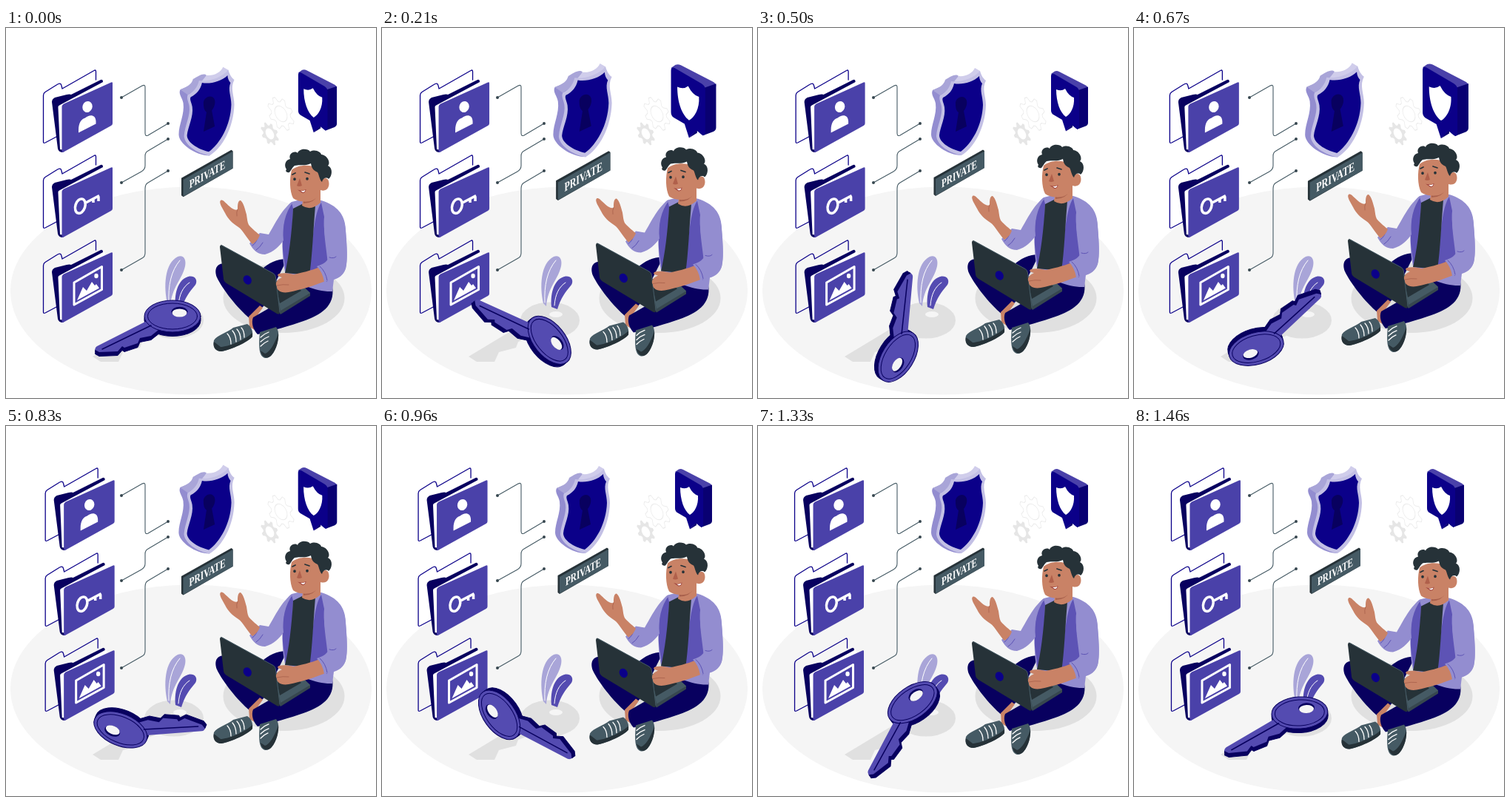
These frames come from a looping animation (500x500 px, 1500 ms). An HTML page:

```html
<!DOCTYPE html>
<html lang="en">
<head>
<meta charset="utf-8">
<title>Private files</title>
<style>
  html, body { margin: 0; height: 100%; overflow: hidden; background: #fff; }
  svg { display: block; width: 100%; height: 100%; }
  .navy { fill: #0b0089; } .deep { fill: #08005f; } .violet { fill: #4a41a9; }
  .iris { fill: #544bb1; } .lilac { fill: #938dd0; } .pale { fill: #a9a5d8; }
  .skin { fill: #c98266; } .coal { fill: #263238; } .slate { fill: #455a64; }
  .floor { fill: #f5f5f5; } .shade { fill: #e0e0e0; } .white { fill: #fff; }
  .line { fill: none; stroke-linecap: round; stroke-linejoin: round; }
</style>
</head>
<body>
<svg viewBox="0 0 500 500">
  <defs>
    <g id="folder">
      <path class="line" stroke="#0b0089" stroke-width="1.3" d="M70 146L53 155Q50.5 156 50.5 154V91Q50.5 88 53 86.500L69 76.500Q74 73 75 78L76 82L119 57.500Q121.500 56 121.500 59V70"/>
      <path class="deep" d="M62 100Q62 96 66 94L82 90Q86 89 88 90L128 70Q131 69 131 73V80L77 168Q71 168 70 163Z"/>
      <path class="white" d="M70.500 108Q70 105 73 104L131 73Q134 72 134 75V82L79 165L73 164Z"/>
      <path class="violet" d="M75.500 106Q75.500 104 78 102.500L142 73.500Q144 72.500 144 74.500V129Q144 131 142 132L78 167.500Q75.500 169 75.500 166.500Z"/>
    </g>
    <path id="blade" d="M190 396L123 430Q120 432 120.500 435L126 438L151 437L157 430L160 432L178 426L181 419L196 416L206 408Z"/>
    <ellipse id="bow" cx="225" cy="389.500" rx="38" ry="21.500"/>
  </defs>

  <ellipse class="floor" cx="250" cy="355" rx="244" ry="140.500"/>
  <ellipse class="shade" cx="375.500" cy="365" rx="82" ry="47"/>
  <g id="gears"></g>

  <g fill="none" stroke="#455a64" stroke-width="1.100">
    <path d="M156 94L184 78Q188 76 188 80V142Q188 147 192 145L219 129"/>
    <path d="M156 209L183 194Q188 191 188 186V173Q188 168 192 166L219 150"/>
    <path d="M156 327L184 311Q188 309 188 304V217Q188 211 192 209L219 193"/>
    <path class="line" stroke="#37474f" stroke-width="4" d="M156 94h0M219 129h0M156 209h0M219 150h0M156 327h0M219 193h0"/>
  </g>

  <g id="folders">
    <use href="#folder"/><use href="#folder" y="115"/><use href="#folder" y="230"/>
    <ellipse class="white" cx="110" cy="106.500" rx="6.600" ry="7.600" transform="rotate(20 110 106.500)"/>
    <path class="white" d="M98 141.500V138C98 128 102 123 107 121.500C112 117 121 116 121.500 126V129.500Z"/>
    <g class="line" stroke="#fff" stroke-width="3.500">
      <ellipse cx="100.500" cy="240.500" rx="6.500" ry="10" transform="rotate(18 100 240)"/>
      <path d="M108 236L126 226.500M118 231v5M125 228v6" stroke-linecap="butt"/>
      <path stroke-width="3" d="M92 344L129.500 322.500V353.500L92 374Z"/>
    </g>
    <path class="white" d="M96 368L104 350L109 355L116 343L120 348L122 346L126 351.500Z"/>
    <ellipse class="white" cx="122" cy="335" rx="2.700" ry="3.300"/>
  </g>

  <g class="shade">
    <ellipse cx="227" cy="395" rx="40" ry="24.500"/>
    <path d="M117 444L190 400L206 416L184 424L181 432L158 438L152 451H128Z"/>
    <ellipse class="floor" cx="235" cy="387" rx="9" ry="4"/>
  </g>
  <path class="pale" d="M218 372C213 350 214 318 232 309C240 306 244 313 242 322C238 340 224 350 222 376Z"/>
  <path class="iris" d="M229 377C227 356 234 338 248 335.500C257 335 259 342 256 347C247 358 242 364 237 380Z"/>
  <path class="line" stroke="#fff" d="M220 371C219 348 223 328 235 314M233 375C234 360 239 350 248 344"/>

  <g id="key">
    <g class="deep" stroke="#08005f">
      <use href="#blade" y="2.500"/><use href="#blade" y="5.500"/>
      <use href="#bow" y="3"/><use href="#bow" y="5.500"/>
    </g>
    <g class="iris">
      <use href="#blade"/><use href="#bow"/>
    </g>
    <g class="line" stroke="#08005f">
      <path stroke-width="1.500" d="M196 402L130 434"/>
      <ellipse cx="225" cy="389.500" rx="33.500" ry="17.500"/>
      <use href="#bow"/>
    </g>
    <ellipse class="deep" cx="234.500" cy="383.500" rx="11" ry="6.700"/>
    <ellipse class="floor" cx="234.500" cy="385" rx="10" ry="5.500"/>
  </g>

  <g id="man">
    <path class="deep" d="M380 312C366 312 354 318 346 326L298 318C284 317 281 326 285 337C292 352 312 378 330 393L348 376Z"/>
    <path class="skin" d="M328 390L343 375L347 378L334 396L336 408L329 404Z"/>
    <path class="deep" d="M441 350C445 376 425 388 402 396C385 402 360 409 340 414C334 408 331 398 334 391L360 376L385 345Z"/>
    <path class="slate" d="M281 422C285 415 300 411 307 405L326 400C332 404 334 410 333 417C328 424 300 436 291 437C283 437 279 430 281 422Z"/>
    <path class="slate" d="M343 411L365 404C370 410 368 420 366 428C362 440 356 447 350 446C342 444 341 432 343 411Z"/>
    <path class="coal" d="M281 424C279 431 283 437 291 437C304 435 328 424 333 417L333 412C322 422 300 431 290 431ZM344 436C346 446 354 448 359 442C366 434 369 420 368 412C363 428 356 438 350 440Z"/>
    <path class="line" stroke="#fff" stroke-width="1.300" d="M299 413Q304 418 304 427M306 409Q311 415 311 424M312 407Q317 412 317 421M318 405Q322 409 322 418M344 418Q349 413 355 411M344 424Q349 419 355 417M344 430Q349 425 354 423"/>

    <path class="lilac" d="M386 235L402 231L426 233C448 240 458 252 459 272C460 290 462 312 459 325C456 335 449 338 443 340L441 356C420 357 395 346 378 333C374 320 373 300 374 285C373 262 375 242 386 235Z"/>
    <path fill="#5d53b5" d="M386 236C375 246 373 275 374 300L378 330L386 290L388 244ZM426 236C416 250 414 290 410 330L434 343C439 318 428 290 430 255Z"/>
    <path class="coal" d="M388 244L400 238L418 240C415 275 414 308 410 334L377 331C382 310 386 280 388 244Z"/>
    <path class="lilac" d="M388 235C374 242 364 264 355 279L343 277L329 291C334 300 340 306 350 306C362 303 370 294 375 287C373 268 377 250 388 235Z"/>
    <path class="line" stroke="#5d53b5" d="M341 280Q339 290 333 294M347 290Q343 297 338 300"/>
    <path class="skin" d="M333 292C326 285 320 273 314 269C306 264 300 258 296 250C293 244 287 236 290 233C293 231 296 236 302 241C306 245 312 247 313 245C313 240 313 233 317 233C321 236 323 245 325 252C326 258 326 262 328 266C333 272 340 277 343 280Q340 288 333 292Z"/>
    <path class="line" stroke="#a8604c" stroke-width=".8" d="M313 245Q311 249 312 254"/>

    <path class="skin" d="M402 226L425 214L425 236Q412 248 400 240Z"/>
    <path fill="#a8604c" d="M402 234Q414 234 421 226Q416 237 402 237Z"/>
    <path class="skin" d="M386 192C383 203 383 220 388 230C394 235 408 236 414 233C422 229 425 223 425 219C434 222 438 214 436 207C435 202 429 202 426 206L422 190C412 184 395 184 386 192Z"/>
    <path class="coal" d="M379 191C375 185 378 178 384 177C381 170 390 165 394 169C397 162 408 163 411 167C418 163 426 168 426 171C435 172 439 183 435 186C442 189 441 200 436 204C433 201 428 203 427 208C424 206 423 198 421 195C414 192 413 188 412 183C403 187 398 184 390 186C387 188 385 193 383 195C379 196 377 193 379 191Z"/>
    <path fill="#b0604b" d="M397 203L393 213Q396 215 400 213Z"/>
    <path class="line" stroke="#263238" stroke-width="1.700" d="M387 198L391 196M404 195L410 197"/>
    <path class="line" stroke="#263238" stroke-width="3.600" d="M390 204v.5M407 203.500v.5"/>
    <path fill="#9c3f3a" d="M394 218.500Q400 221 405.500 218Q405 223 400.500 223Z"/>
    <path class="white" d="M398 220Q402 220.500 404.500 219Q404 222 401 222Z"/>

    <path fill="#37474f" d="M362 342L392 340L411 358V362L371 387L366 380Z"/>
    <path class="slate" d="M362 342L392 340L411 358L371 382Z"/>
    <path class="coal" d="M365 350L390 346L399 355L370 372Z"/>
    <path class="coal" d="M289 296Q289 292 293 294L360 331Q364 333 364 337L370 384Q370 388 366 386L298 345Q294 342 294 339Z"/>
    <path class="line" stroke="#455a64" d="M291 293.500L361 331.500Q364 333 364.500 337L370 384"/>
    <ellipse class="navy" cx="326" cy="340.500" rx="5.300" ry="6.500" transform="rotate(-30 326 340)"/>

    <path class="skin" d="M424 323C412 328 398 331 389 333C380 331 374 331 369 332C365 334 368 336 373 337C366 340 363 345 366 349C365 354 372 359 382 357C398 354 420 347 434 341Z"/>
    <path class="line" stroke="#a8604c" stroke-width=".8" d="M366 348Q374 346 382 347"/>
    <path class="lilac" d="M432 242C450 242 458 255 459 275C461 295 462 315 459 325C453 339 440 341 430 343Q428 330 420 322C430 319 434 315 437 309C431 290 427 262 432 242Z"/>
    <path class="line" stroke="#5d53b5" d="M424 322Q432 329 434 341M437 310Q443 312 446 309"/>
  </g>

  <g id="shield">
    <path class="lilac" d="M236 84L300 58L275 172C256 172 234 156 234 144C234 130 242 117 240 102C239 95 233 90 236 84Z"/>
    <path class="pale" d="M236 84C246 80 251 77 253 70C260 66 267 61 271 65L262 80L246 91Z"/>
    <path fill="#d0cdeb" d="M271 65C281 66 290 61 293 54L300 58L292 72L262 76Z"/>
    <path fill="#c3c0e5" d="M246 91C254 87 259 81 261 72C271 74 291 69 300 58C302 65 305 69 308 71C302 82 308 92 308 104C307 135 292 162 275 172C258 169 242 158 241 146C242 132 250 118 248 106C247 100 244 96 246 91Z"/>
    <path class="navy" d="M250 94C258 90 263 84 265 75C276 77 291 73 299 65C299 69 301 73 303 75C299 84 304 93 304 104C303 132 289 156 274 167C258 163 245 154 245 145C246 134 254 120 252 107C251 101 248 97 250 94Z"/>
    <path class="deep" d="M267 103C266 96 274 91 279 94C284 97 283 106 278 112L282 133L267 140L271 114C268 112 267 108 267 103Z"/>
    <path class="coal" d="M237.500 202L304 164.500L306 166V189L240 227L237.500 225Z"/>
    <path class="slate" d="M240 204L306 166.500V189L240 226.500Z"/>
    <text class="white" transform="matrix(.7 -.4 0 1 248 216)" font-family="'Liberation Serif', serif" font-weight="700" font-size="16">PRIVATE</text>
  </g>

  <g id="badge">
    <path class="violet" d="M396 62L401 58.500Q404 57.500 407 59L442 77Q446 79 446 82L434 90Z"/>
    <path fill="#090072" d="M433 84L446 79.500V128Q446 131 443 132.500L431 137ZM416 139.500L425 134V129Z"/>
    <path class="navy" d="M396 65Q396 60.500 400 62L430 79.500Q434 82 434 86V133Q434 138 430 136L424 131L416 139.500L411 124L399 117Q396 115 396 111Z"/>
    <path class="white" d="M403 83Q410 86 415 82Q420 92 427 94C428 107 422 117 416 120C408 114 403 100 403 83Z"/>
  </g>
</svg>

<script>
const LOOP = 1500;
const $ = id => document.getElementById(id);

// Toothed ring squeezed into an isometric plane
function gear(x, y, size, style) {
  const teeth = 8, points = [];
  for (let i = 0; i < teeth * 4; i++) {
    const a = (i + 0.5) * Math.PI / (teeth * 2);
    const r = i % 4 < 2 ? size : size * 0.74;
    points.push([Math.cos(a) * r, Math.sin(a) * r].map(v => v.toFixed(2)));
  }
  const h = size * 0.48;
  const hole = `M${h} 0A${h} ${h} 0 1 0 ${-h} 0A${h} ${h} 0 1 0 ${h} 0Z`;
  return `<path transform="matrix(.84 .38 0 1 ${x} ${y})" fill-rule="evenodd" ${style} d="M${points.join('L')}Z${hole}"/>`;
}
$('gears').innerHTML =
  gear(371.5, 116, 21, 'fill="#fff" stroke="#ebebeb"') +
  gear(356.5, 143, 14.5, 'fill="#e6e6e6"');

// cubic-bezier(.25, .1, .25, 1)
function ease(x) {
  const bezier = (a, b, s) => 3 * a * s * (1 - s) ** 2 + 3 * b * s * s * (1 - s) + s ** 3;
  let low = 0, high = 1;
  for (let i = 0; i < 20; i++) {
    const mid = (low + high) / 2;
    if (bezier(0.25, 0.25, mid) < x) low = mid; else high = mid;
  }
  return bezier(0.1, 1, low);
}
const linear = x => x;

function track(keys, t, curve) {
  const i = keys.findIndex(([time]) => time > t);
  const [t0, v0] = keys[i - 1], [t1, v1] = keys[i];
  return v0 + (v1 - v0) * curve((t - t0) / (t1 - t0));
}

const SHAKE = [0, -1, 2, -4, 4, -4, 4, -4, 2, -1, 0].map((x, i) => [i * 150, x]);
const PULSE = [[0, 0.14], [150, 1], [450, 0], [600, 0], [750, 1], [900, 0], [LOOP, 0]];
const SPIN = [[0, 0], [1460, 356.5], [LOOP, 360]];
const FLOAT = [[0, 0], [750, -9], [LOOP, 0]];

const set = (id, transform) => $(id).setAttribute('transform', transform);
const zoom = (id, x, y, scale) =>
  set(id, `translate(${x} ${y}) scale(${scale}) translate(${-x} ${-y})`);

function draw(now) {
  const t = now % LOOP;
  const pulse = track(PULSE, t, ease);
  set('folders', `translate(${track(SHAKE, t, ease)} 0)`);
  set('man', `translate(0 ${track(FLOAT, t, linear)})`);
  set('key', `rotate(${track(SPIN, t, linear)} 192 407)`);
  zoom('shield', 271, 140.5, 1 + 0.1 * pulse);
  zoom('badge', 421, 98.5, 1 + 0.31 * pulse);
}

let start;
function tick(now) {
  start ??= now;
  draw(now - start);
  requestAnimationFrame(tick);
}
draw(0);
requestAnimationFrame(tick);
</script>
</body>
</html>
```
